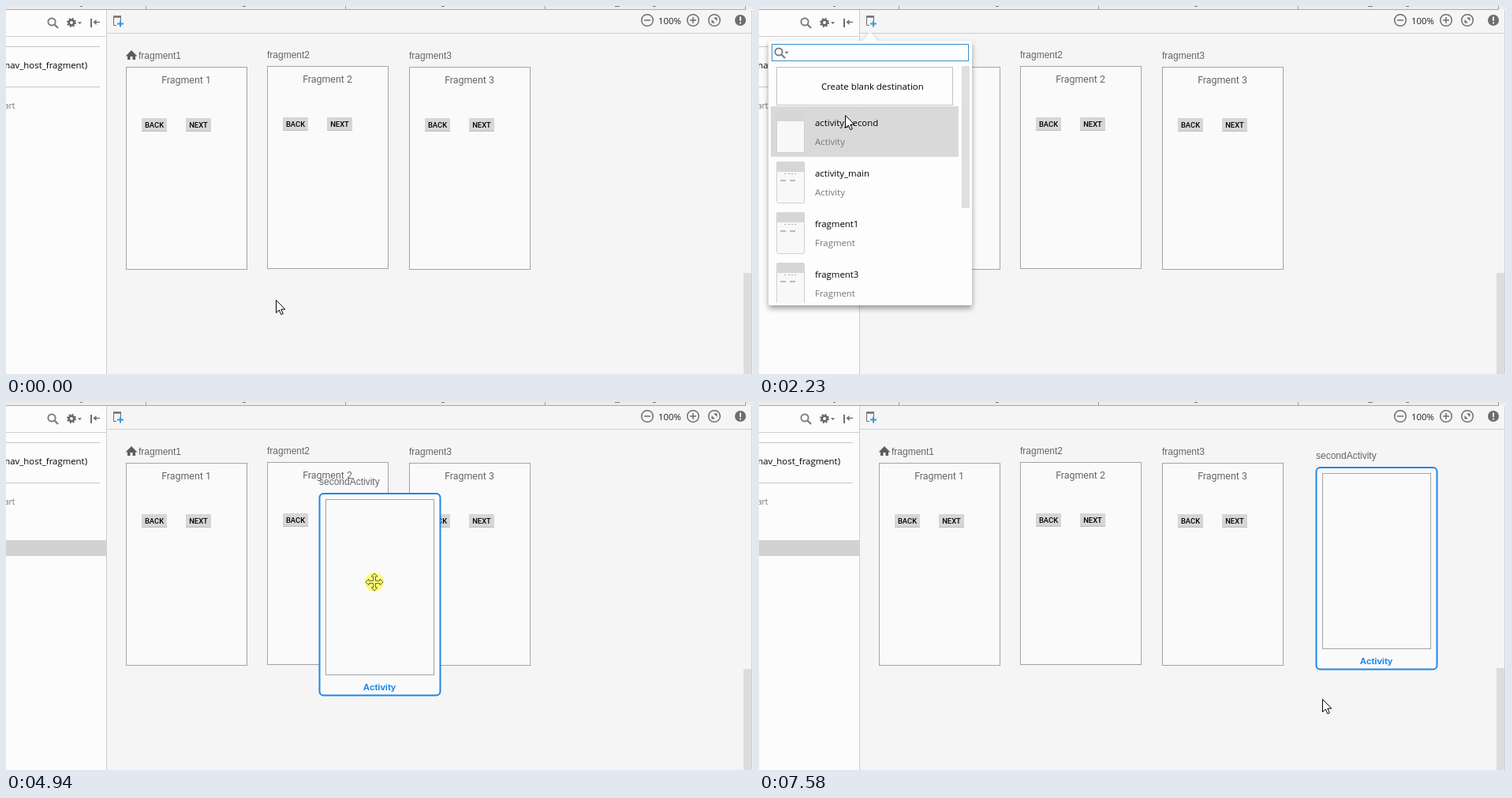
Animation of 947x466 px, one loop 8670 ms. Source, as an HTML page:

```html
<!DOCTYPE html>
<html lang="en">
<head>
<meta charset="utf-8">
<title>Adding a destination</title>
<style>
  html, body { margin: 0; height: 100%; overflow: hidden; background: #f5f5f5; }
  svg { display: block; width: 100vw; height: 100vh; }
  text { white-space: pre; }
  .ui { font: 11.4px "Open Sans", "Noto Sans", sans-serif; }
  .label { font: 12px "Liberation Sans", Arial, sans-serif; fill: #666; }
  .title { font: 12.4px Roboto, sans-serif; fill: #666; text-anchor: middle; }
  .btn { font: 500 9.4px Roboto, sans-serif; text-anchor: middle; }
  .kind { font: bold 11.5px "Liberation Sans", Arial, sans-serif; fill: #1a84ea; text-anchor: middle; }
  .soft { fill: #777; }
  .line { fill: none; stroke: #6e6e6e; }
  .card { fill: #fafafa; stroke: #a4a4a4; }
</style>
</head>
<body>
<svg viewBox="0 0 947 466">
  <defs>
    <filter id="shadow" x="-10%" y="-10%" width="120%" height="120%">
      <feDropShadow dx="0" dy="4" stdDeviation="3.5" flood-opacity=".38"/>
    </filter>
    <clipPath id="list"><rect x="12" y="74" width="258" height="302"/></clipPath>
    <g id="lens">
      <circle r="4.6" fill="none" stroke="#808080" stroke-width="2"/>
      <path d="M3.5 3.5L8 8" stroke="#808080" stroke-width="2.4"/>
    </g>
    <path id="caret-down" d="M-2.5-1.2h5L0 1.5z" fill="#666"/>
  </defs>

  <rect width="947" height="466" fill="#f5f5f5"/>
  <rect width="127" height="466" fill="#fcfcfc"/>

  <!-- tab strip -->
  <rect width="947" height="4" fill="#ececec"/>
  <path d="M177.500 0v4M430.500 0v4M683.500 0v4M937.500 0v4" stroke="#9d9d9d"/>
  <path d="M0 4.500H938" stroke="#a9a9a9"/>
  <path d="M94 .5h3M300 .5h4M552 .5h4M772 .5h6M820 .5h4" stroke="#777"/>

  <!-- side panel -->
  <path d="M0 38.500H127M127.500 5V466M128 34.500H946M945.500 5V466" stroke="#cfcfcf"/>
  <path d="M0 51.500H119M0 102.500H119" stroke="#c6c6c6"/>
  <rect id="selected" y="175" width="127" height="20" fill="#d2d2d2"/>
  <text class="ui" x="103" y="79" text-anchor="end">nav_host_fragment)</text>
  <text class="ui soft" x="11.500" y="130" text-anchor="end" style="font-size:10.500px">Start</text>
  <use href="#lens" x="58" y="20"/>
  <circle cx="83" cy="21" r="3.300" fill="none" stroke="#666" stroke-width="2.600"/>
  <circle cx="83" cy="21" r="5" fill="none" stroke="#666" stroke-width="2" stroke-dasharray="2 1.927"/>
  <use href="#caret-down" x="93.500" y="21.500"/>
  <path d="M108 16v11" stroke="#707070" stroke-width="2"/>
  <path d="M112 20.500h7" stroke="#707070" stroke-width="1.400"/>
  <path d="M110.500 20.500l4-3.500v7z" fill="#707070"/>

  <!-- editor toolbar -->
  <rect id="hover" x="129.500" y="6.500" width="24" height="26" fill="#e0e0e0" stroke="#c6c6c6"/>
  <path class="line" d="M140 24.500h-3.500v-11h9v5"/>
  <path d="M136 13.500h10" stroke="#6e6e6e" stroke-width="2.500"/>
  <path d="M145 18.500v8M141 22.500h8" stroke="#3d96d6" stroke-width="2"/>
  <g class="line" stroke-width="1.500">
    <circle cx="813" cy="18" r="7.300"/>
    <circle cx="871" cy="18" r="7.300"/>
    <circle cx="898" cy="18" r="7.300"/>
    <path d="M809 18h8M867 18h8M871 14v8"/>
  </g>
  <path d="M897 14.500h4.500v4.500zM899 21.500h-4.500V17z" fill="#6e6e6e"/>
  <text class="ui" x="827" y="22.500" fill="#222">100%</text>
  <circle cx="931" cy="18" r="7" fill="#6e6e6e"/>
  <path d="M931 13.500v5.500M931 20.500v2" stroke="#fff" stroke-width="1.800"/>
  <rect id="bar" x="935" width="10" height="130" fill="#dcdcdc"/>

  <path d="M151.500 63.500l7.500-7.500 7.500 7.500h-2.500v4.500h-3.500v-4h-3v4h-3.500v-4.500z" fill="#5c5c5c"/>
  <g id="fragments"></g>

  <g id="activity">
    <text class="label" x="168" y="65">secondActivity</text>
    <rect x="168.500" y="76" width="153" height="255.500" rx="5" fill="#fafafa" stroke="#1f86e8" stroke-width="2"/>
    <rect class="card" x="176.500" y="83.500" width="137" height="222"/>
    <text class="kind" x="244.500" y="325">Activity</text>
  </g>

  <g id="popup">
    <path filter="url(#shadow)" fill="#fdfdfd" d="M15 44H132L141 33 150 44H267a3 3 0 0 1 3 3V376a3 3 0 0 1-3 3H15a3 3 0 0 1-3-3V47a3 3 0 0 1 3-3z"/>
    <rect id="field" x="16.500" y="48.500" width="249" height="21" fill="#fff"/>
    <use href="#lens" x="25" y="58"/>
    <use href="#caret-down" x="35" y="59"/>
    <path id="caret" d="M42.500 51v16" stroke="#000"/>
    <rect x="22.500" y="77.500" width="223" height="48" fill="none" stroke="#888" stroke-dasharray="1 1"/>
    <text class="ui" x="79" y="106">Create blank destination</text>
    <rect id="row" x="15" y="127" width="238" height="64" fill="#d9d9d9"/>
    <g id="rows" clip-path="url(#list)"></g>
    <rect x="257" y="76" width="10" height="180" fill="#dfdfdf"/>
  </g>

  <g id="pointer">
    <circle id="press" r="12" fill="#ff0" fill-opacity=".52"/>
    <path id="arrow" d="M.5.5V16.500L4.300 13l2.500 5.700 2.500-1-2.500-5.600h5z" fill="#fff" stroke="#000"/>
    <path id="move" d="M0-11L4-7H1.500V-1.500H7V-4L11 0 7 4V1.500H1.500V7H4L0 11-4 7H-1.500V1.500H-7V4L-11 0-7-4V-1.500H-1.500V-7H-4Z" fill="none" stroke="#66664a"/>
  </g>
</svg>

<script>
const LOOP = 8670, START = 450, STEP = 77.5;
const GRAB = [238, 188], GRAB_TICK = 54, DROP_TICK = 83;
const el = id => document.getElementById(id);

const button = (x, y, name) => `
  <rect x="${x}" y="${y}" width="32" height="17" rx="1" fill="#d6d6d6"/>
  <path d="M${x} ${y + 16.5}h32" stroke="#bcbcbc"/>
  <text class="btn" x="${x + 16}" y="${y + 12}">${name}</text>`;

const fragment = (n, x, y) => `
  <text class="label" x="${n == 1 ? 168 : x}" y="${y - 10}">fragment${n}</text>
  <rect class="card" x="${x + .5}" y="${y + .5}" width="153" height="256"/>
  <text class="title" x="${x + 76.5}" y="${y + 21}">Fragment ${n}</text>
  ${button(x + 20, y + 65, "BACK")}${button(x + 76, y + 65, "NEXT")}`;

const listRow = ([name, kind], i) => `
  <g transform="translate(0 ${64 * i})">
    <rect x="22.5" y="133.500" width="35" height="52" rx="2" fill="#f8f8f8" stroke="#d0d0d0"/>
    <rect x="22" y="133" width="36" height="13" rx="2" fill="#d6d6d6"/>
    ${i ? `<path d="M32 148.500h2M37 148.500h2M41 148.500h2M45 148.500h2" stroke="#aaa"/>
    <path d="M27 157h7M39 157h7" stroke="#bbb" stroke-width="2"/>` : ""}
    <text class="ui" x="71" y="152">${name}</text>
    <text class="ui soft" x="71" y="176">${kind}</text>
  </g>`;

el("fragments").innerHTML = fragment(1, 152, 77) + fragment(2, 331, 76) + fragment(3, 511, 77);
el("rows").innerHTML = [
  ["activity_second", "Activity"], ["activity_main", "Activity"],
  ["fragment1", "Fragment"], ["fragment3", "Fragment"]
].map(listRow).join("");

// pointer path: tick, x, y
const path = [
  [-1, 342, 372], [1, 332, 382], [3, 275, 300], [6, 150, 110], [8, 106, 40], [9, 118, 24], [11, 147, 15],
  [19, 147, 15], [20, 142, 27], [22, 113, 122], [23, 109, 138], [24, 109, 140],
  [36, 109, 140], [37, 108, 147], [40, 108, 147], [42, 107, 153],
  [47, 107, 153], [50, 190, 213], [52, 234, 200], [53, 238, 188],
  [54, 238, 188], [55, 268, 194], [56, 328, 210], [58, 467, 228], [59, 540, 234], [61, 700, 225], [62, 747, 219],
  [63, 747, 219], [68, 792, 184], [69, 792, 184], [72, 798, 186], [73, 798, 186], [77, 776, 195],
  [86, 776, 195], [89, 748, 292], [92, 714, 376]
];
// piecewise-linear value of [tick, ...values] keys
function along(keys, tick) {
  const i = keys.findIndex(k => k[0] >= tick);
  if (i < 0) return keys.at(-1).slice(1);
  if (i == 0) return keys[0].slice(1);
  const [a, b] = [keys[i - 1], keys[i]], p = (tick - a[0]) / (b[0] - a[0]);
  return a.slice(1).map((v, j) => Math.round(v + (b[j + 1] - v) * p));
}

const within = (t, from, to) => t >= from && t < to;
const show = (id, on) => el(id).style.opacity = +on;
const place = (id, x, y) => el(id).setAttribute("transform", `translate(${x} ${y})`);

function popupOpacity(t) {
  if (t < 41) return Math.min(1, Math.max(0, (t - 12) / 5));
  return t < 42 ? .66 : t < 44 ? .33 : 0;
}

function draw(ms) {
  const t = Math.max(-1, Math.floor((ms - START) / STEP + .25));
  const [x, y] = along(path, t);
  const [dx, dy] = along(path, Math.min(DROP_TICK, Math.max(GRAB_TICK, t)));
  const dragging = within(t, GRAB_TICK + 1, DROP_TICK);

  place("pointer", x, y);
  show("arrow", !dragging);
  show("move", dragging);
  show("press", t == 82 ? .5 : t == 12 || t == 37 || dragging);

  place("activity", dx - GRAB[0], dy - GRAB[1]);
  show("activity", t >= 41);
  show("selected", t >= 41);

  show("hover", within(t, 11, 21));
  show("popup", popupOpacity(t));
  show("row", t >= 22);
  show("caret", t < 21 || within(t, 27, 33));
  el("field").setAttribute("stroke", t < 37 ? "#3590cf" : "#c4c4c4");
  el("bar").setAttribute("y", t < 82 ? 338 : 337);
}

const begin = performance.now();
function frame() {
  draw((performance.now() - begin) % LOOP);
  requestAnimationFrame(frame);
}
frame();
</script>
</body>
</html>
```
